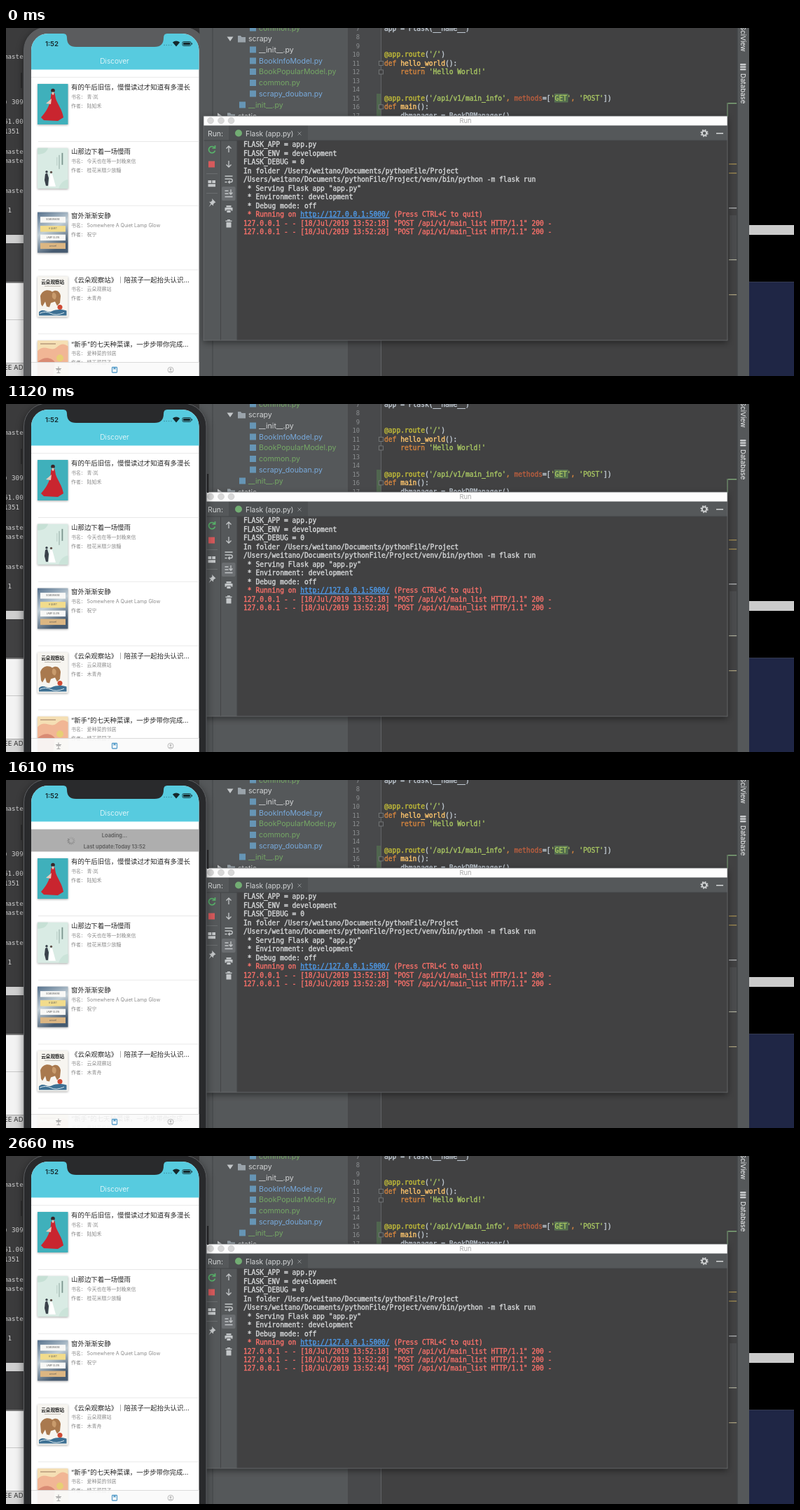
Write an HTML page that moves like this. It is 1125 px wide and 498 px high and loops after 2.73 s.

```html
<!DOCTYPE html>
<html lang="en">
<head>
<meta charset="utf-8">
<title>Pull to refresh</title>
<style>
  html, body { margin: 0; width: 100%; height: 100%; overflow: hidden; background: #000; }
  svg { display: block; width: 100vw; height: 100vh; }
  text { white-space: pre; font-family: Inter, "Noto Sans CJK SC", "Noto Sans CJK", "Noto Sans", sans-serif; }
  text.mono { font-family: "DejaVu Sans Mono", monospace; stroke-width: .38; }
  .dec { fill: #c3bd38; stroke: #c3bd38 }
  .key { fill: #d5853f; stroke: #d5853f }
  .fn  { fill: #ffc66d; stroke: #ffc66d }
  .str { fill: #a9c763; stroke: #a9c763 }
  .arg { fill: #bb5f3f; stroke: #bb5f3f }
  .icon { fill: none; stroke: #c4c7c9; stroke-width: 1.3 }
</style>
</head>
<body>
<svg id="stage" viewBox="0 0 1125 498" preserveAspectRatio="none"></svg>
<script>
const rect = (x, y, w, h, fill, more = '') =>
  `<rect x="${x}" y="${y}" width="${w}" height="${h}" fill="${fill}" ${more}/>`;
const dot = (x, y, r, fill, more = '') =>
  `<circle cx="${x}" cy="${y}" r="${r}" fill="${fill}" ${more}/>`;
const path = (d, fill, more = '') => `<path d="${d}" fill="${fill}" ${more}/>`;
const icon = (d, more = '') => `<path class="icon" d="${d}" ${more}/>`;
// y is the middle of the line
const text = (x, y, s, size, fill, more = '') =>
  `<text x="${x}" y="${y + size * .36}" font-size="${size}" fill="${fill}" ${more}>${s}</text>`;
const code = (x, y, s, fill) => text(x, y, s, 9.65, fill, `class="mono" stroke="${fill}"`);
const span = (cls, s) => `<tspan class="${cls}">${s}</tspan>`;
const group = (more, ...parts) => `<g ${more}>${parts.join('')}</g>`;
const MID = 'text-anchor="middle"';

const PANEL = '#55585a', EDITOR = '#414142', EDGE = '#434547', LIGHT = '#c4c7c9';

function desktop() {
  const shell = [[41, 'maste'], [106, ') 309'], [134, '51.00'], [148, '1351'],
    [177, 'maste'], [190, 'maste'], [233, 'maste'], [261, ' 1']];
  return [
    rect(0, 0, 290, 297, '#3b3b3c'),
    rect(21, 64, 2, 22, '#2b2b2c'),
    ...shell.map(([y, s]) => text(-3, y, s, 9.2, '#d2d2d2', 'class="mono"')),
    rect(0, 296, 290, 12, '#cfcfcf'),
    rect(0, 308, 290, 56, '#414142'),
    rect(0, 363, 290, 2, '#777'),
    rect(0, 365, 290, 133, '#f3f3f3'),
    rect(0, 417, 290, 1, '#c8c8c8'),
    rect(0, 479, 290, 19, '#d5d5d5'),
    rect(0, 479, 290, 1, '#a5a5a5'),
    text(-3, 486, 'EE AD', 9.5, '#333'),
    rect(1061, 282, 64, 14, '#cbcbcb'),
    rect(1061, 364, 64, 134, '#1f2645'),
    rect(1061, 363, 64, 1, '#343a50'),
  ].join('');
}

function tree() {
  const blue = '#78aadc', green = '#75a865', white = '#d2d4d5';
  const files = [[361, 0, 'common.py', green], [361, 31, '__init__.py', white],
    [361, 47, 'BookInfoModel.py', blue], [361, 62.5, 'BookPopularModel.py', green],
    [361, 78.5, 'common.py', green], [361, 94, 'scrapy_douban.py', blue],
    [346, 110, '__init__.py', green]];
  const folder = (x, y, name, turn) => [
    path('M-4.5-3h9l-4.5 6.5z', LIGHT, `transform="translate(${x - 26} ${y}) rotate(${turn})"`),
    path(`M${x - 15} ${y - 4.5}h4l1.5 2h5.5v7.5h-11z`, '#9aa3aa'),
    text(x, y, name, 10.6, white)];
  return [
    rect(276, 0, 213, 498, PANEL), rect(294.5, 0, 1, 498, EDGE),
    ...files.map(([x, y, s, c]) => rect(x - 13, y - 4.5, 9, 9, '#6695b5') + text(x, y, s, 10.6, c)),
    ...folder(346, 15.5, 'scrapy', 0), ...folder(331, 126, 'static', -90),
  ].join('');
}

function editor() {
  const row = n => 38 + (n - 10) * 12.48;
  const lines = {
    7: 'app = Flask(__name__)',
    10: span('dec', '@app.route') + '(' + span('str', "'/'") + ')',
    11: span('key', 'def ') + span('fn', 'hello_world') + '():',
    12: span('key', '    return ') + span('str', "'Hello World!'"),
    15: span('dec', '@app.route') + '(' + span('str', "'/api/v1/main_info'") + span('key', ', ') +
      span('arg', 'methods') + '=[' + span('str', "'GET'") + span('key', ', ') + span('str', "'POST'") + '])',
    16: span('key', 'def ') + span('fn', 'main') + '():',
    17: '    dbmanager = BookDBManager()',
  };
  const out = [rect(488, 0, 48, 498, '#48494b'), rect(536, 0, 508, 498, EDITOR),
    rect(535, 0, 1, 498, '#626466'), rect(529, 94, 6, 32, '#50664f'),
    rect(783.5, 94.5, 18.5, 11.5, '#506b4c', 'stroke="#6a8a62" stroke-width=".6"')];
  for (let n = 7; n < 18; n++) {
    out.push(text(505, row(n), n, 8.8, '#8d9092', 'class="mono" text-anchor="end"'));
    if (lines[n]) out.push(code(540, row(n), lines[n], '#c0c9d2'));
  }
  for (const n of [11, 12, 16])
    out.push(rect(532.5, row(n) - 3, 6, 6, EDITOR, 'stroke="#7d8082" stroke-width=".8"'));
  out.push(rect(1031, 107, 12.5, 1.5, '#7fa678'), rect(1029.5, 107, 1, 20, '#7fa678'),
    rect(1033, 268, 10, 64, '#4a4b4d'));
  for (const [y, c] of [[194, '#a08b52'], [207, '#a08b52'], [257, '#aeb1b3'], [331, '#a9aa98'], [381, '#a9a07e']])
    out.push(rect(1032, y, 11.5, 1.3, c));
  out.push(rect(1043.5, 0, 17.5, 498, PANEL), rect(1043.5, 0, 1, 498, '#393b3d'),
    group('transform="translate(1052 0) rotate(90)" font-weight="500"',
      text(-3, 0, 'SciView', 9.6, '#dfe1e2'), text(65, 0, 'Database', 9.6, '#dfe1e2')));
  for (const y of [51, 54.5, 58]) out.push(rect(1048, y, 8.5, 2.6, '#c8cacc', 'rx="1"'));
  return out.join('');
}

function runWindow() {
  const plain = '#d6d8d9', red = '#f8716a', step = 12.45;
  const log = s => `127.0.0.1 - - [18/Jul/2019 13:52:${s}] "POST /api/v1/main_list HTTP/1.1" 200 -`;
  const lines = ['FLASK_APP = app.py', 'FLASK_ENV = development', 'FLASK_DEBUG = 0',
    'In folder /Users/weitano/Documents/pythonFile/Project',
    '/Users/weitano/Documents/pythonFile/Project/venv/bin/python -m flask run',
    ' * Serving Flask app "app.py"', ' * Environment: development', ' * Debug mode: off',
    ' * Running on <tspan fill="#4f9bea" stroke="#4f9bea" text-decoration="underline">http://127.0.0.1:5000/</tspan> (Press CTRL+C to quit)',
    log(18), log(28), log(44)];
  return [
    rect(282, 126, 748, 321, EDITOR, 'style="filter:drop-shadow(0 3px 5px #0007)"'),
    rect(282, 139, 748, 22, PANEL), rect(282, 161, 48, 286, PANEL),
    rect(318, 139, 113, 22, '#4c4f51'), rect(282, 160.5, 748, 1, EDGE),
    rect(282, 126, 748, 13.5, '#fdfdfd'),
    ...[292, 307, 321.5].map(x => dot(x, 132.5, 4.4, '#d9d9d9', 'stroke="#c3c3c3" stroke-width=".6"')),
    text(656, 133, 'Run', 9.4, '#aaa', MID),
    text(288, 151, 'Run:', 10.4, '#d5d7d8'),
    dot(332, 150.5, 5, '#72ad73'),
    text(342, 151, 'Flask (app.py)', 10.2, '#d5d7d8'),
    icon('M416.5 148.5l5 5m0-5l-5 5', 'style="stroke:#888b8d;stroke-width:1"'),
    dot(997, 150.5, 3.2, 'none', 'stroke="#d0d2d3" stroke-width="2"'),
    dot(997, 150.5, 4.8, 'none', 'stroke="#d0d2d3" stroke-width="1.6" stroke-dasharray="1.9 1.87"'),
    rect(1014, 150, 10, 1.5, '#d5d7d8'),
    rect(306, 161, 1, 286, EDGE), rect(329.5, 161, 1, 286, EDGE),
    rect(286, 208, 16, 1, '#6a6d6f'), rect(286, 236, 16, 1, '#6a6d6f'),
    icon('M297.5 171a4.6 4.6 0 1 0 1 4.5M298.5 168v4h-4', 'style="stroke:#58b36a;stroke-width:1.7"'),
    rect(289, 190.5, 9, 9, '#d65a5c'),
    rect(288.5, 218, 4.7, 4, LIGHT), rect(294.3, 218, 4.7, 4, LIGHT), rect(288.5, 223.2, 10.5, 4, LIGHT),
    path('M294 244l5.5 5.5-1.5 .5-2 2 0 2.5-2.5-2.3-4 4 3-5-2.5-2.5h2.5l2-2z', LIGHT),
    icon('M318 178v-9m-3.5 3.5l3.5-3.5 3.5 3.5'),
    icon('M318 190v9m-3.5-3.5l3.5 3.5 3.5-3.5'),
    icon('M312.5 212h11M312.5 216h8.5a2.2 2.2 0 0 1 0 4.5h-3m1.5-2l-2 2 2 2M312.5 220.5h3'),
    rect(308, 227, 19.5, 20, '#6a6d70', 'rx="2"'),
    icon('M312.5 233h5m-5 4h5m-5 4.5h11M321 231v7m-2.5-2.5l2.5 2.5 2.5-2.5'),
    rect(314.5, 254, 7, 2.5, LIGHT), rect(312.5, 257, 11, 4.5, LIGHT),
    rect(315, 260.5, 6, 4, LIGHT, `stroke="${PANEL}" stroke-width=".8"`),
    rect(313.5, 275.5, 9, 1.5, LIGHT), rect(316, 274, 4, 1.5, LIGHT), rect(314.5, 278, 7, 7.5, LIGHT),
    ...lines.map((s, i) => group(i === 11 ? 'id="newLog"' : '',
      code(339, 167 + i * step, s, i < 8 ? plain : red))),
    rect(282, 126, 748, 321, 'none', 'stroke="#6c6e70" stroke-width=".8"'),
  ].join('');
}

// Covers are 43.5 by 58
const covers = [
  () => rect(0, 0, 43.5, 58, '#3fb0bb') +
    path('M19.5 14l5-1 1.5 8c3 9 9 15 11 27l-8 5-20-1-4-4c7-8 12-16 13.5-26z', '#c9252f') +
    path('M20 21l-8 7 7 1z', '#e7c9bb') + dot(22, 9.5, 2.8, '#3a2528') + rect(20.8, 11.5, 2.5, 4, '#e7c9bb'),
  () => rect(0, 0, 43.5, 58, '#d9ebe4') +
    path('M0 0h15c-2 7-8 9-15 9z', '#c6e0d5') + path('M30 58c3-9 8-12 13.5-13v13z', '#cbe3d9') +
    path('M11 37l3-1 2 7-1 11h-3l-2-8z', '#39414a') + dot(13, 34, 1.7, '#39414a') +
    path('M18 37h3l5 18h-10z', '#fff') + dot(19.5, 34.5, 1.6, '#5a4a45') +
    rect(34.5, 7, 1.8, 17, '#65807a', 'opacity=".8"') + rect(30.5, 10, 1, 20, '#8fa8a0') + rect(27.5, 13, .7, 12, '#a9bfb7'),
  () => rect(0, 0, 43.5, 58, 'url(#sky)') +
    [['#f8f8f6', 6.5], ['#f2dc8c', 19.5], ['#f8f8f6', 32], ['#dcb682', 44]].map(([c, y], i) =>
      rect(4, y, 36, 8.5, c) + text(22, y + 4.3, ['SOMEWHERE', 'A QUIET', 'LAMP GLOW', 'a novel'][i], 3, '#555', MID)).join(''),
  () => rect(0, 0, 43.5, 58, '#f7f5f0') +
    text(21.7, 8, '云朵观察站', 6.6, '#222', MID + ' font-weight="700"') + rect(10, 13.5, 23, .9, '#b9b2a8') +
    path('M4 28c3-9 12-10 17-6 6-4 11 0 12 6l-1 10-4 4-3-6-6 2-2 6-4-1-2-7-4 7-2-3z', '#a9794e') +
    path('M22 23c5 0 6 6 3 10-5-1-5-6-3-10z', '#c99b6c') + dot(32, 44, 3.5, '#cf4a34') +
    path('M2 51c7-6 11 2 18-1s13-3 21.5-1v7h-39.5z', '#3d7093') + path('M3 53q9-4 16 0t19-1', 'none', 'stroke="#dbe8ee"'),
  () => rect(0, 0, 43.5, 58, '#f5dfb4') + path('M0 15c10-11 19 2 27-5s11-5 16.5-2v25h-43.5z', '#f1b695') +
    path('M0 31c9-9 20-7 25 0l-4 27h-21z', '#d98b74') + dot(32, 25, 5, '#e7cf75') + rect(4, 4, 22, 1.5, '#b79a7c'),
];

const books = [
  ['有的午后旧信，慢慢读过才知道有多漫长', '青·岚', '陆知禾'],
  ['山那边下着一场慢雨', '今天也在等一封晚来信', '桂花米糕少放糖'],
  ['窗外渐渐安静', 'Somewhere A Quiet Lamp Glow', '祝宁'],
  ['《云朵观察站》｜陪孩子一起抬头认识...', '云朵观察站', '木青舟'],
  ['“新手”的七天种菜课，一步步带你完成...', '爱种菜的邻居', '晴天菜园子'],
];

function list() {
  const label = (y, s, id) => text(155, y, s, 7.5, '#5b5b5b', `${MID} font-weight="600" id="${id}"`);
  let spokes = '';
  for (let i = 0; i < 12; i++)
    spokes += `<path d="M0-2.8v-2.8" stroke="#666" stroke-width="1.1" opacity="${.15 + i * .06}" transform="rotate(${i * 30})"/>`;
  return rect(36, -120, 239.5, 190.5, '#aeaeae') + label(47, '', 'status') + label(63, 'Last update:Today 13:52', 'updated') +
    group('transform="translate(93 55)"',
      group('id="arrow"', path('M0 7v-14m-3.8 4.5l3.8-4.5 3.8 4.5', 'none', 'stroke="#555"')),
      group('id="spinner"', spokes)) +
    books.map(([title, name, author], i) => {
      const y = 80 + i * 91.8, pair = (dy, key, s) =>
        text(93, y + dy, key + '：', 6.9, '#8a8a8a') + text(115.5, y + dy, s, 7, '#8a8a8a');
      return group(`transform="translate(45 ${y})" style="filter:drop-shadow(0 1px 1.5px #0005)"`, covers[i]()) +
        text(93, y + 5, title, 9.45, '#262626') + pair(18.5, '书名', name) + pair(31.5, '作者', author) +
        rect(46, y + 82, 229.5, .8, '#e3e3e3');
    }).join('');
}

function phone() {
  const body = 'currentColor', ink = '#15282c';
  return [
    rect(287, 100, 2.2, 27, body),
    rect(25.5, -1, 260.5, 560, body, 'rx="33" stroke="#5d5f62" stroke-width="1" style="filter:drop-shadow(0 4px 6px #0007)"'),
    group('clip-path="url(#screen)"',
      rect(36, 8, 240, 490, '#fff'),
      group('clip-path="url(#view)"', group('id="list"', list()), rect(272, 72, 2, 134, '#858585', 'rx="1" id="bar"')),
      rect(36, 8, 240, 51.5, '#57cbdf'),
      text(155, 47, 'Discover', 10.2, '#fff', MID + ' font-weight="300"'),
      text(56, 23, '1:52', 9.6, ink, 'font-weight="600"'),
      path('M82 8q5 0 5 6 0 13 13 13h112q13 0 13-13 0-6 5-6z', body),
      ...[226, 229.3, 232.6, 235.9].map(x => dot(x, 24.5, .8, '#3a8fa0')),
      path('M237.8 20.5q5.2-4 10.4 0l-5.2 6z', ink),
      rect(252, 19.5, 12, 6, 'none', `rx="1.5" stroke="${ink}" stroke-width=".8"`),
      rect(253.2, 20.7, 9.6, 3.6, ink), rect(264.8, 21.5, 1.2, 2, ink),
      rect(36, 478, 240, 20, '#fafafa', 'opacity=".93"'), rect(36, 478, 240, .7, '#cfcfcf'),
      path('M71 487.5h8m-4-3v9m-2.5 0h5m-5.5-4l3-2 3 2', 'none', 'stroke="#aaa" stroke-width="1.2"'),
      rect(151.5, 485.5, 7, 7.5, 'none', 'stroke="#5a9fcb" stroke-width="1.3" rx=".8"'),
      path('M153.5 485h3v4l-1.5-1-1.5 1z', '#5a9fcb'),
      dot(235, 489.3, 4, 'none', 'stroke="#b0b0b0" stroke-width=".9"'), dot(235, 488.3, 1.3, '#b0b0b0'),
      path('M232.5 491.8q2.5-2.5 5 0z', '#b0b0b0')),
  ].join('');
}

const defs = `<defs>
  <clipPath id="front"><rect id="frontRect" width="1125" height="498"/></clipPath>
  <clipPath id="screen"><rect x="36" y="8" width="239.5" height="540" rx="24"/></clipPath>
  <clipPath id="view"><rect x="36" y="70.5" width="240" height="428"/></clipPath>
  <linearGradient id="sky" x2=".4" y2="1"><stop stop-color="#56718c"/><stop offset=".5" stop-color="#c3d0d8"/><stop offset="1" stop-color="#455a70"/></linearGradient>
</defs>`;

const $ = id => document.getElementById(id);
$('stage').innerHTML = defs + desktop() + tree() + editor() + runWindow() +
  group('id="phone" clip-path="url(#front)"', phone());

const LOOP = 2730, TICK = 70;
const RAISE = 1050, TURN = 1225, RELEASE = 1430, LOGGED = 1820;
const pull = [[1120, 0], [1190, 42], [1260, 110], [1400, 112], [1470, 32], [1820, 32], [1960, 0]];

function along(keys, t) {
  const i = keys.findIndex(k => k[0] > t);
  if (i < 1) return 0;
  const [t0, a] = keys[i - 1], [t1, b] = keys[i];
  return a + (b - a) * (t - t0) / (t1 - t0);
}
const show = (id, on) => $(id).setAttribute('visibility', on ? 'visible' : 'hidden');

function draw(t) {
  const raised = t >= RAISE, loading = t >= RELEASE;
  $('phone').setAttribute('color', raised ? '#292a2c' : '#5b5c5e');
  $('frontRect').setAttribute('width', raised ? 1125 : 277);
  $('list').setAttribute('transform', `translate(0 ${along(pull, t)})`);
  $('status').textContent = loading ? 'Loading...' : t < TURN ? 'Pull down to refresh' : 'Release to refresh';
  const turn = Math.min(1, Math.max(0, (t - TURN) / 44));
  $('arrow').setAttribute('transform', `rotate(${180 * (1 - turn)})`);
  $('spinner').setAttribute('transform', `rotate(${t / TICK * 30})`);
  show('arrow', !loading);
  show('spinner', loading);
  show('newLog', t >= LOGGED);
  $('bar').setAttribute('opacity', t < 1190 || t >= 1540 ? 0 : t < 1470 ? 1 : .4);
}

// Each picture is held for one tick
function loop(now) {
  draw(Math.floor(now % LOOP / TICK) * TICK);
  requestAnimationFrame(loop);
}
draw(0);
requestAnimationFrame(loop);
</script>
</body>
</html>
```
